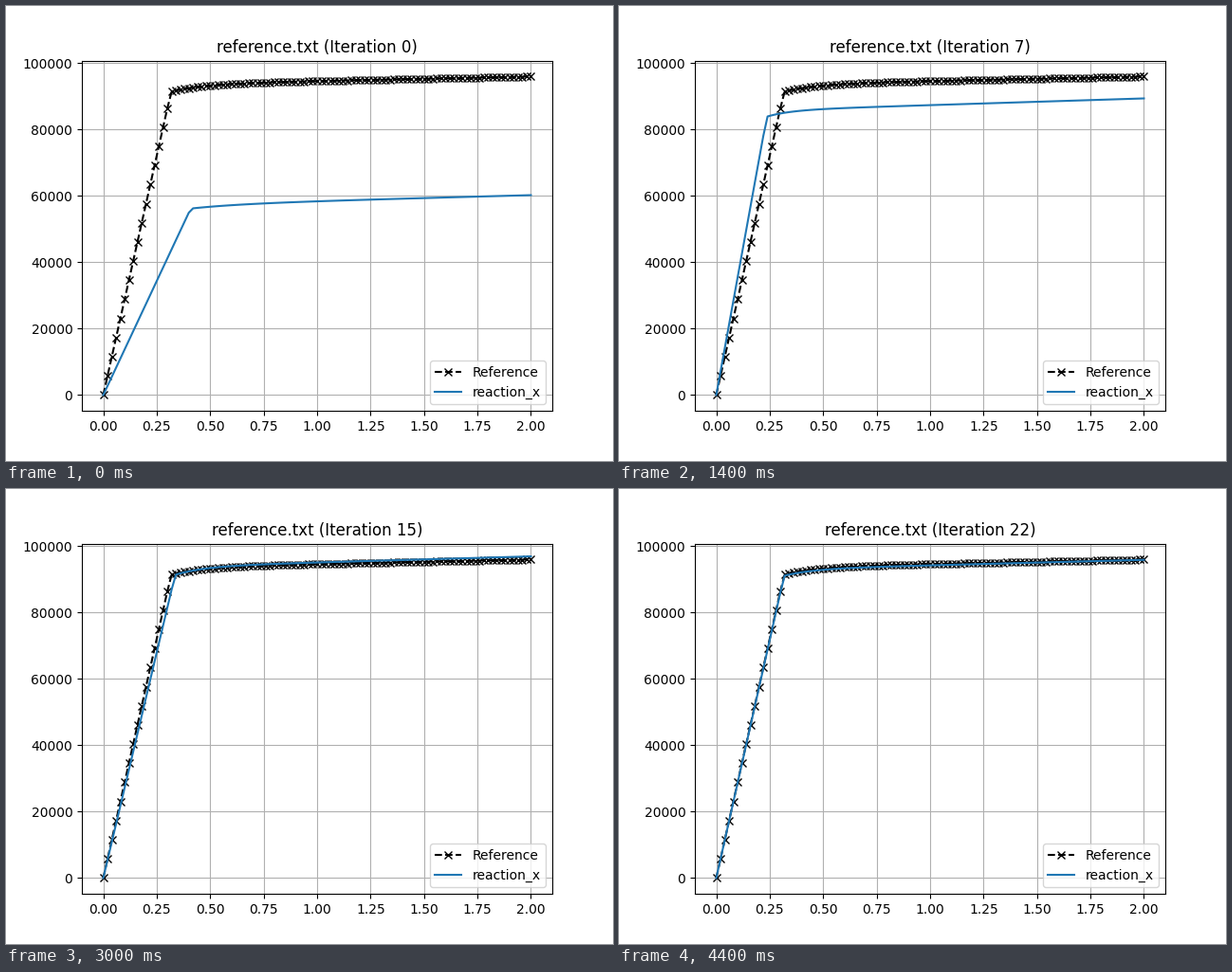
Write a matplotlib script that moves like this. It is 640x480 px and loops after 4.6 s.

```python
import numpy as np
import matplotlib.pyplot as plt
from matplotlib.animation import FuncAnimation

FRAMES, INTERVAL = 23, 200
x = np.linspace(0, 2, 101)

# Key points of the fit: iteration, stiffness, yield force, final force
KEYS = np.array([
    (0, 137.4, 56.2, 60.25),
    (3, 205.3, 82.7, 88.2),
    (5, 228, 83.3, 88.8),
    (7, 355, 83.9, 89.4),
    (10, 335, 85.3, 91.2),
    (15, 272, 91.4, 96.95),
    (18, 287, 90.1, 95.5),
    (22, 287, 91.1, 95.9),
]).T


def response(stiffness, force, final, slope, rate):
    """Elastic line, then hardening that saturates towards a straight slope."""
    d = x - force / stiffness
    gain = final - force - slope * d[-1]
    plastic = force + slope * d + gain * (1 - np.exp(-rate * d))
    return 1000 * np.minimum(stiffness * x, plastic)


def iteration(i):
    stiffness, force, final = (np.interp(i, KEYS[0], row) for row in KEYS[1:])
    slope = 2.2 - 0.025 * i - 0.45 * np.exp(-i)
    return response(stiffness, force, final, slope, rate=1 + stiffness / 45)


plt.rcParams["font.family"] = "DejaVu Sans"
fig, ax = plt.subplots(figsize=(6.4, 4.8), dpi=100)
ax.plot(x, response(288.4, 91.45, 96, 1.35, 6.3), "kx--", label="Reference")
line, = ax.plot(x, iteration(0), color="C0", label="reaction_x")
ax.set_xlim(-0.1, 2.1)
ax.set_ylim(-4800, 100800)
ax.grid()
ax.legend(loc="lower right")
title = ax.set_title("")


def update(i):
    line.set_ydata(iteration(i))
    title.set_text(f"reference.txt (Iteration {i})")
    return line, title


anim = FuncAnimation(fig, update, frames=FRAMES, interval=INTERVAL,
                     init_func=lambda: update(0), repeat=True, repeat_delay=0)
plt.show()
```
